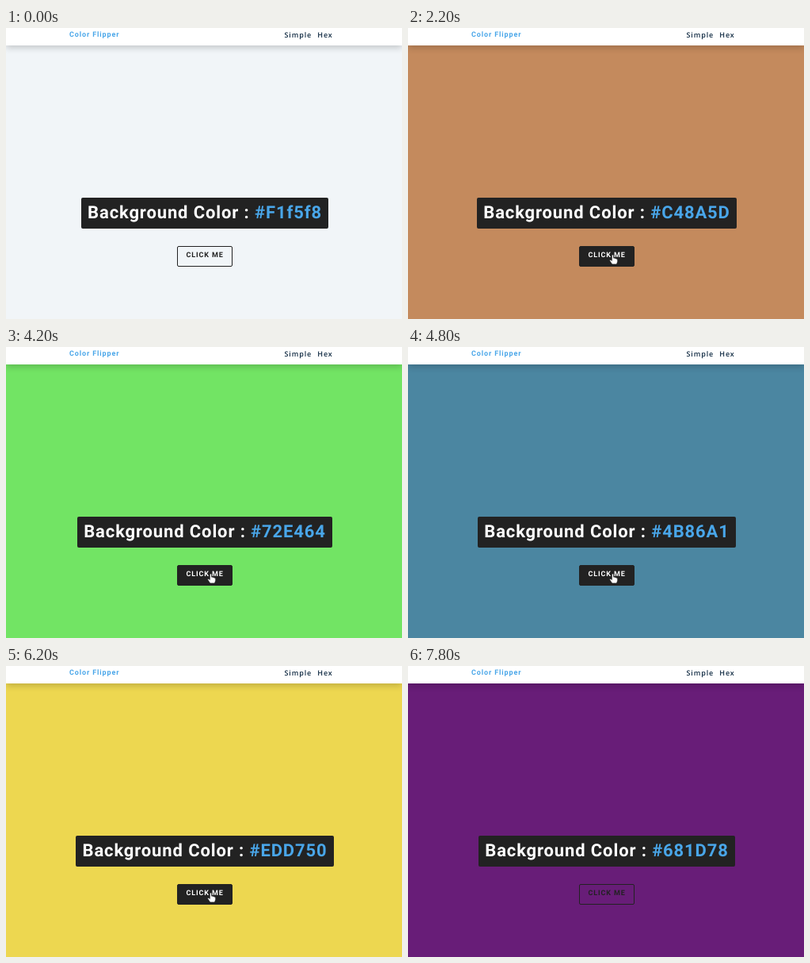
An HTML page that plays this animation: 500 by 367 pixels, repeating every 8.1 s.

```html
<!DOCTYPE html>
<html lang="en">
<head>
<meta charset="utf-8">
<title>Color Flipper</title>
<style>
  * { margin: 0; box-sizing: border-box; }
  html, body { width: 100%; height: 100%; overflow: hidden; }
  body {
    position: relative;
    font: 700 9px/1 Roboto, sans-serif;
    letter-spacing: .87px;
    white-space: nowrap;
    text-rendering: geometricPrecision;
  }
  nav {
    position: absolute; top: 0; left: 0; width: 100%; height: 22px;
    background: #fff;
    box-shadow: 0 2.8px 8.4px rgba(0, 0, 0, .2);
  }
  nav span { position: absolute; line-height: 12px; }
  .brand { left: 80px; top: 2.5px; color: #49a6e9; }
  .link { top: 3px; color: #102a42; font-family: "Open Sans", sans-serif; font-weight: 600; }
  main { position: absolute; left: 0; top: 214px; width: 502px; text-align: center; }
  h2 {
    display: inline-block; height: 39px; padding: 0 8.5px;
    border-radius: 2px;
    background: #222; color: #fff;
    font-size: 22px; line-height: 39px;
  }
  h2 span { color: #49a6e9; }
  #button {
    position: absolute; left: 216px; top: 275px; width: 70px; height: 26px;
    border: 1.2px solid #222; border-radius: 2px;
    line-height: 23.6px; text-align: center;
  }
  svg { position: absolute; left: 0; top: 0; width: 14px; height: 18px; overflow: visible; }
  path { fill: #fff; stroke: #222; stroke-width: .8; stroke-linejoin: round; }
</style>
</head>
<body>
<nav>
  <span class="brand">Color Flipper</span>
  <span class="link" style="left:351.5px">Simple</span>
  <span class="link" style="left:393.3px">Hex</span>
</nav>
<main><h2>Background Color : <span id="hex"></span></h2></main>
<div id="button">CLICK ME</div>
<svg id="cursor">
  <path id="hand" d="M-1.2 .6Q0-.8 1.2 .6V4.2Q2.3 3.4 3 4.7Q4.2 4 4.8 5.3Q6 5 6.2 6.4V8.6L5 12H-.8L-3.8 7.6Q-3.8 5.9-2.3 6.5L-1.2 7.6Z"/>
  <path id="arrow" d="M0 0V11L2.5 8.6L4.3 12.4L6 11.6L4.3 8H7.7Z"/>
</svg>
<script>
  const LOOP = 8100, STEP = 100;
  const $ = id => document.getElementById(id);
  const clamp = v => Math.min(1, Math.max(0, v));

  // [click time, resulting background]
  const flips = [
    [0, '#F1f5f8'], [800, '#A9C4DB'], [1200, '#95A341'], [1700, '#3B7EC2'],
    [2100, '#C48A5D'], [2600, '#5A69B7'], [3000, '#B5323E'], [3500, '#4FA89C'],
    [3800, '#9C5BA6'], [4200, '#72E464'], [4500, '#D08F43'], [4800, '#4B86A1'],
    [5100, '#B86C8D'], [5300, '#2FD836'], [5600, '#7A54C9'], [5800, '#C97B52'],
    [6000, '#58A9C0'], [6200, '#EDD750'], [6400, '#A34D72'], [6600, '#5C9B68'],
    [6900, '#681D78']
  ];

  // [time, x, y] of the pointer tip
  const path = [
    [200, 272, 358], [700, 257, 286], [1700, 257, 286], [2100, 258.5, 286],
    [7000, 258.5, 286], [7100, 259, 288], [7300, 260, 303], [7800, 266, 385]
  ];

  function pointerAt(t) {
    const i = path.findIndex(p => p[0] > t);
    if (i < 1) return null;
    const [t0, x0, y0] = path[i - 1], [t1, x1, y1] = path[i];
    const k = (t - t0) / (t1 - t0);
    return [x0 + (x1 - x0) * k, y0 + (y1 - y0) * k];
  }

  function draw(now) {
    const t = Math.floor(now % LOOP / STEP) * STEP;

    const color = flips.filter(f => f[0] <= t).pop()[1];
    document.body.style.background = color;
    $('hex').textContent = color;

    const hover = clamp((t - 500) / 300) - clamp((t - 7200) / 300);
    const ink = 34 + 221 * hover;
    $('button').style.background = `rgba(34, 34, 34, ${hover})`;
    $('button').style.color = `rgb(${ink}, ${ink}, ${ink})`;

    const tip = pointerAt(t);
    $('cursor').style.display = tip ? '' : 'none';
    if (tip) {
      const over = tip[1] < 301;
      $('cursor').style.transform = `translate(${tip[0]}px, ${tip[1]}px)`;
      $('hand').style.display = over ? '' : 'none';
      $('arrow').style.display = over ? 'none' : '';
    }
    requestAnimationFrame(() => draw(performance.now()));
  }
  draw(performance.now());
</script>
</body>
</html>
```
